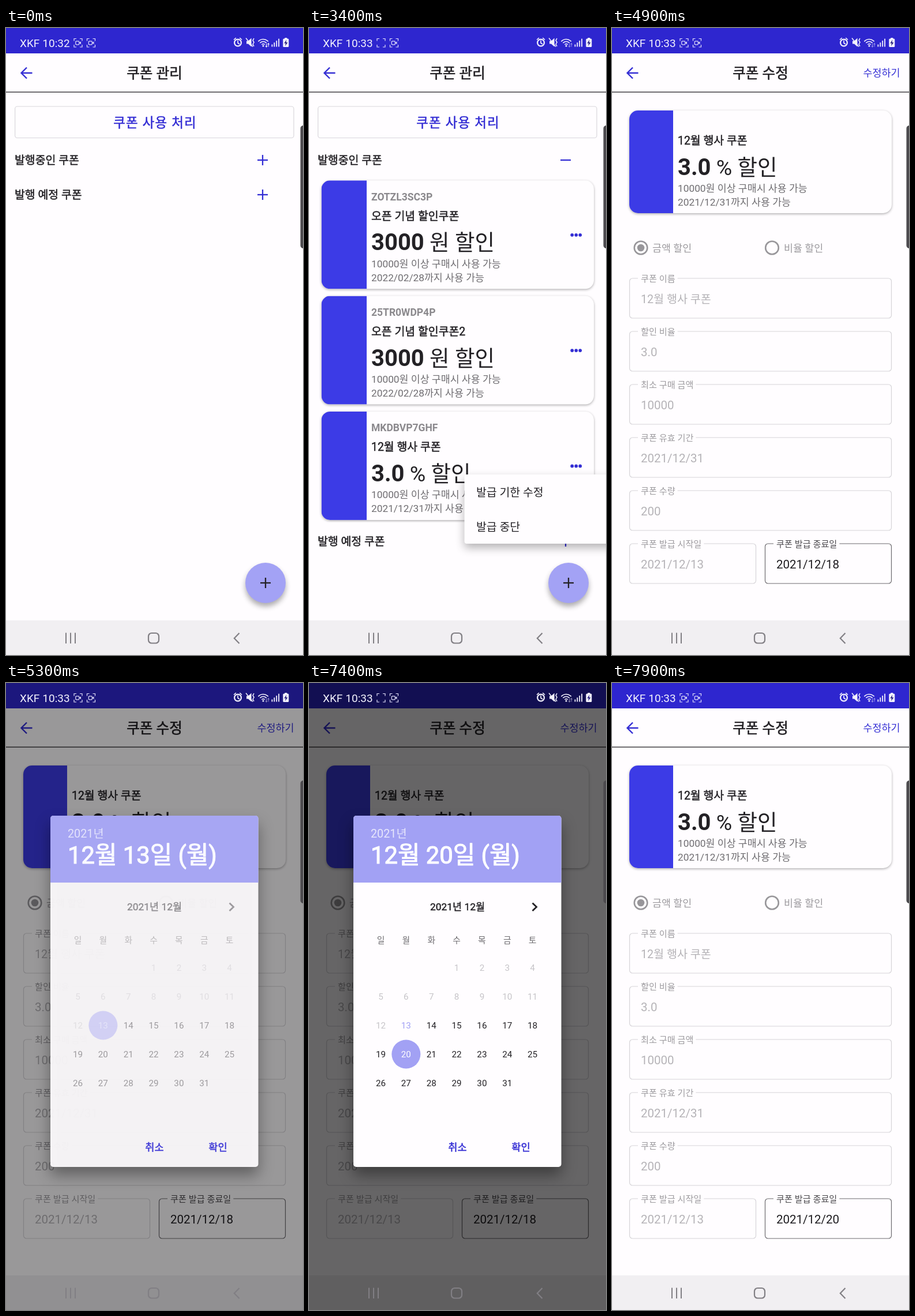
An HTML page with a canvas for the animation above (8000 ms loop, 515 by 1087 pixels).

```html
<!DOCTYPE html>
<html lang="ko">
<head>
<meta charset="utf-8">
<style>
  html, body { margin: 0; width: 100%; height: 100%; overflow: hidden; background: #fffdff; }
  canvas { display: block; width: 515px; height: 1087px; }
</style>
</head>
<body>
<canvas id="stage"></canvas>
<script>
const W = 515, H = 1087, LOOP = 8000, STEP = 100;
const PAPER = '#fffdff', BLUE = '#342ed4', BAND = '#3c3be6', LILAC = '#a2a1f4', INK = '#232125', GRAY = '#6f6d71';
const FONTS = 'Roboto, "Noto Sans CJK KR", "Noto Sans CJK", "Noto Sans CJK JP", sans-serif';

const canvas = document.getElementById('stage');
const ctx = canvas.getContext('2d');
const ratio = window.devicePixelRatio || 1;
canvas.width = W * ratio;
canvas.height = H * ratio;

const progress = (t, from, to) => Math.min(1, Math.max(0, (t - from) / (to - from)));
const easeOut = p => 1 - (1 - p) ** 3;
const mix = (a, b, p) => a + (b - a) * p;

// ---- drawing helpers ----
function layer(alpha, draw) {
  if (alpha <= 0) return;
  ctx.save();
  ctx.globalAlpha *= alpha;
  draw();
  ctx.restore();
}

// weight: 'regular', 'medium' (thin outline) or 'bold'; returns the advance width
function text(str, x, y, size, color, { weight = 'regular', align = 'left', spacing = 0 } = {}) {
  ctx.font = `${weight === 'bold' ? 700 : 400} ${size}px ${FONTS}`;
  ctx.textAlign = align;
  ctx.letterSpacing = spacing + 'px';
  ctx.fillStyle = color;
  ctx.fillText(str, x, y);
  if (weight === 'medium') {
    ctx.strokeStyle = color;
    ctx.lineWidth = size * 0.026;
    ctx.lineJoin = 'round';
    ctx.strokeText(str, x, y);
  }
  return ctx.measureText(str).width;
}

function rect(x, y, w, h, color) {
  ctx.fillStyle = color;
  ctx.fillRect(x, y, w, h);
}

function line(d, color, width) {
  ctx.strokeStyle = color;
  ctx.lineWidth = width;
  ctx.lineJoin = 'miter';
  ctx.stroke(new Path2D(d));
}

function shape(d, color) {
  ctx.fillStyle = color;
  ctx.fill(new Path2D(d));
}

function disc(x, y, r, color) {
  ctx.beginPath();
  ctx.arc(x, y, r, 0, Math.PI * 2);
  ctx.fillStyle = color;
  ctx.fill();
}

function ring(x, y, r, color, width) {
  ctx.beginPath();
  ctx.arc(x, y, r, 0, Math.PI * 2);
  ctx.strokeStyle = color;
  ctx.lineWidth = width;
  ctx.stroke();
}

function box(x, y, w, h, r, color, width = 1.2) {
  ctx.beginPath();
  ctx.roundRect(x, y, w, h, r);
  ctx.strokeStyle = color;
  ctx.lineWidth = width;
  ctx.stroke();
}

function shadowed(blur, drop, opacity, draw) {
  ctx.save();
  ctx.shadowColor = `rgba(0,0,0,${opacity})`;
  ctx.shadowBlur = blur * ratio;
  ctx.shadowOffsetY = drop * ratio;
  draw();
  ctx.restore();
}

function panel(x, y, w, h, r, color) {
  ctx.beginPath();
  ctx.roundRect(x, y, w, h, r);
  ctx.fillStyle = color;
  ctx.fill();
}

const minus = (x, y, r, color) => line(`M${x - r} ${y}h${2 * r}`, color, 2.3);
function plus(x, y, r, color) {
  minus(x, y, r, color);
  line(`M${x} ${y - r}v${2 * r}`, color, 2.3);
}

// ---- shared parts ----
function header(title) {
  rect(0, 0, W, 44, '#2e26cf');
  rect(0, 44, W, H - 44, PAPER);
  rect(0, 110.4, W, 1.4, '#343236');
  line('M45.5 78H27M36 68.5L26.5 78l9.5 9.5', BLUE, 2.4);
  text(title, 257.5, 87, 24.6, INK, { weight: 'medium', align: 'center' });
}

function couponCard(x, y, w, h, bandWidth) {
  shadowed(4, 1.5, 0.32, () => panel(x, y, w, h, 15, PAPER));
  ctx.save();
  ctx.beginPath();
  ctx.roundRect(x, y, w, h, 15);
  ctx.clip();
  rect(x, y, bandWidth, h, BAND);
  ctx.restore();
}

function couponText(x, y, { name, amount, unit, minimum, until }) {
  text(name, x, y, 19.4, INK, { weight: 'medium' });
  const used = amount ? text(amount, x, y + 52.5, 40, INK, { weight: 'bold' }) : 0;
  text(` ${unit} 할인`, x + used, y + 52.5, 37.5, INK);
  text(`${minimum}원 이상 구매시 사용 가능`, x, y + 82, 17.3, GRAY);
  text(`${until}까지 사용 가능`, x, y + 106, 17.3, GRAY);
}

const coupon = (code, name, amount, unit, until) => ({ code, name, amount, unit, minimum: '10000', until });
const coupons = [
  coupon('ZOTZL3SC3P', '오픈 기념 할인쿠폰', '3000', '원', '2022/02/28'),
  coupon('25TR0WDP4P', '오픈 기념 할인쿠폰2', '3000', '원', '2022/02/28'),
  coupon('MKDBVP7GHF', '12월 행사 쿠폰', '3.0', '%', '2021/12/31')
];
const blankCoupon = { name: '', amount: '', unit: '원', minimum: '', until: '' };

// ---- coupon list ----
function listScreen(t) {
  const open = easeOut(progress(t, 50, 400));
  const grown = 601 * open;
  header('쿠폰 관리');
  box(15.6, 136, 483.4, 54.5, 4, '#d9d7dc');
  text('쿠폰 사용 처리', 258.5, 172, 22.4, BLUE, { weight: 'medium', align: 'center', spacing: 1.25 });

  text('발행중인 쿠폰', 15, 236, 19.4, INK, { weight: 'medium' });
  (open > 0 ? minus : plus)(445, 229, 9, BLUE);

  ctx.save();
  ctx.beginPath();
  ctx.rect(0, 256, W, grown);
  ctx.clip();
  coupons.forEach((item, i) => {
    const y = 264.3 + i * 200.3;
    couponCard(21.5, y, 472.5, 188, 78.5);
    text(item.code, 108, y + 34.5, 17.5, '#8b898d', { weight: 'bold' });
    couponText(108, y + 68.5, item);
    for (const x of [456.2, 463.2, 470.2]) disc(x, y + 94.5, 2.9, BLUE);
  });
  ctx.restore();

  text('발행 예정 쿠폰', 15, 296 + grown, 19.4, INK, { weight: 'medium' });
  plus(445, 289 + grown, 9, BLUE);

  if (t >= 2100 && t < 2400) disc(463, 759, 25 * progress(t, 2000, 2200), 'rgba(0,0,0,.1)');

  shadowed(10, 6, 0.32, () => disc(450, 962, 35, '#a3a2f5'));
  plus(450, 962, 9, INK);
}

function menu(t) {
  const grow = easeOut(progress(t, 2150, 2500));
  const fade = Math.min(grow, 1 - progress(t, 4100, 4300));
  layer(fade, () => {
    ctx.translate(W, 774);
    ctx.scale(grow, grow);
    ctx.translate(-W, -774);
    shadowed(16, 7, 0.3, () => panel(269.5, 774, 260, 120, 4, PAPER));
    const press = progress(t, 3700, 4100);
    if (press > 0) {
      ctx.save();
      ctx.beginPath();
      ctx.rect(269.5, 774, 246, 60);
      ctx.clip();
      disc(392.5, 804, 121.5 * press, '#dedcdf');
      ctx.restore();
    }
    text('발급 기한 수정', 290, 811.5, 19.4, INK);
    text('발급 중단', 290, 871.5, 19.4, INK);
  });
}

// ---- coupon form ----
function field(x, y, w, rise, { hint, label = hint, value, size = 20.5, active }) {
  box(x, y, w, 69, 5, active ? '#6c6a6e' : '#d6d4d8');
  const caption = rise > 0 ? label : hint;
  const fontSize = mix(19.5, 15.2, rise);
  if (rise > 0) {
    ctx.font = `400 15.2px ${FONTS}`;
    ctx.letterSpacing = '0px';
    rect(x + 14.5, y - 2, ctx.measureText(caption).width + 9, 4, PAPER);
    text(value, x + 19.5, y + 43, size, active ? '#1d1b1f' : '#b5b3b7');
  }
  text(caption, x + 19.5, mix(y + 41, y + 6, rise), fontSize, active ? '#4c4a4e' : '#9d9b9f');
}

function editScreen(t) {
  const rise = easeOut(progress(t, 4100, 4400));
  header('쿠폰 수정');
  text('수정하기', 499.5, 84, 17.4, BLUE, { align: 'right' });
  couponCard(30, 143, 455, 178, 76);
  couponText(114, 202, rise > 0 ? coupons[2] : blankCoupon);

  ring(50, 381, 11.3, '#98969a', 2.6);
  disc(50, 381, 6.3, '#98969a');
  text('금액 할인', 70, 388, 17.4, '#9c9a9e');
  ring(277.5, 381, 11.3, '#98969a', 2.6);
  text('비율 할인', 298, 388, 17.4, '#9c9a9e');

  [
    { hint: '쿠폰 이름', value: '12월 행사 쿠폰', size: 19.6 },
    { hint: '할인 금액', label: '할인 비율', value: '3.0' },
    { hint: '최소 구매 금액', value: '10000' },
    { hint: '쿠폰 유효 기간', value: '2021/12/31' },
    { hint: '쿠폰 수량', value: '200' }
  ].forEach((item, i) => field(30.5, 434 + i * 92, 454, rise, item));
  field(30.5, 894, 219, rise, { hint: '쿠폰 발급 시작일', value: '2021/12/13' });
  field(265.5, 894, 219, rise, {
    hint: '쿠폰 발급 종료일', value: t >= 7800 ? '2021/12/20' : '2021/12/18', active: true
  });
}

// ---- date picker ----
function calendar(t, selected) {
  const column = i => 124.5 + i * 43.85;
  text('2021년 12월', 257.5, 394, 17.4, INK, { weight: 'medium', align: 'center' });
  line('M387.5 381.5l7 6.8-7 6.8', INK, 2.8);
  [...'일월화수목금토'].forEach((day, i) => text(day, column(i), 451, 14.8, GRAY, { align: 'center' }));
  for (let day = 1; day <= 31; day++) {
    const cell = day + 2;
    const x = column(cell % 7), y = 493.5 + Math.floor(cell / 7) * 50;
    let color = day < 13 ? '#c6c4c8' : day === 13 ? LILAC : INK;
    if (day === selected) {
      disc(x, y, 25, LILAC);
      color = '#fff';
    } else if (day === 20 && t === 6800) {
      disc(x, y, 20, 'rgba(162,161,244,.3)');
    }
    text(day, x, y + 5.5, 15.2, color, { align: 'center' });
  }
}

function datePicker(t) {
  const closing = 1 - progress(t, 7700, 7900);
  const selected = t >= 6900 ? 20 : 13;
  layer(0.6 * progress(t, 5100, 5400) * closing, () => rect(0, 0, W, H, '#000'));
  layer(progress(t, 5100, 5315) * closing, () => {
    shadowed(26, 14, 0.4, () => panel(77, 230, 360.5, 609, 5, PAPER));
    ctx.beginPath();
    ctx.roundRect(77, 230, 360.5, 116, [5, 5, 0, 0]);
    ctx.fillStyle = LILAC;
    ctx.fill();
    text('2021년', 107, 268, 19.8, 'rgba(255,255,255,.75)');
    text(`12월 ${selected}일 (월)`, 107, 313, 41.8, '#fff', { weight: 'medium' });
    layer(progress(t, 5200, 5422), () => calendar(t, selected));
    text('취소', 257.5, 811, 17.6, BLUE, { weight: 'medium', align: 'center' });
    text('확인', 367.5, 811, 17.6, BLUE, { weight: 'medium', align: 'center' });
  });
}

// ---- system bars ----
function recorder(x, withCamera) {
  const white = '#e2e0fa';
  line(`M${x} 22.5v-4h4M${x + 10} 18.5h4v4M${x + 14} 29v4h-4M${x + 4} 33h-4v-4`, white, 1.2);
  if (!withCamera) return;
  box(x + 2.8, 22.8, 6, 6, 1, white, 1.2);
  shape(`M${x + 9} 25.5l3-2.2v5l-3-2.2z`, white);
}

function systemBars(t) {
  const white = '#f3f2fd';
  const nextMinute = t >= 3200;
  text('XKF', 24, 33, 19, white);
  text(nextMinute ? '10:33' : '10:32', 63.3, 33, 19, white);
  recorder(118, Math.floor((t + 100) / 500) % 2 === 0);
  recorder(140.5, true);

  ring(402, 25.5, 5.9, white, 2.2);
  line('M402 21.5v4.5l3 2M395 20.5l3.8-3.3M409 20.5l-3.8-3.3', white, 1.6);
  shape('M417 22.5h3l5.5-5v15l-5.5-5h-3z', white);
  line('M416 17.5l12 15M430 18l-2 3.4 2 3.4-2 3.4 2 3.4', white, 1.5);
  for (const r of [3.5, 7.5, 11.5]) {
    ctx.beginPath();
    ctx.arc(446, 31, r, -Math.PI * 0.77, -Math.PI * 0.23);
    ctx.strokeStyle = white;
    ctx.lineWidth = 1.6;
    ctx.stroke();
  }
  disc(446, 31, 1.6, white);
  layer(nextMinute ? 0.5 : 1, () => line('M451.5 33v-6M450 31l1.5 2 1.5-2M455 26.5v6M453.5 28.5l1.5-2 1.5 2', white, 1.1));
  for (let i = 0; i < 4; i++) rect(460.5 + i * 3.9, 28.5 - i * 3.3, 1.8, 4 + i * 3.3, white);
  panel(480.3, 18.5, 10, 14.5, 1.5, white);
  rect(483.3, 17, 4, 2, white);
  shape('M486.3 20.5l-4 6h2.6l-.8 4.7 4.3-6.2h-2.7z', '#2a2380');

  line('M104 1048.5v18.5M112 1048.5v18.5M120 1048.5v18.5', '#817f84', 2);
  box(247, 1049, 18, 17.5, 5.5, '#817f84', 2.2);
  line('M404.5 1049l-8.7 9 8.7 9', '#817f84', 2.2);
  panel(510.5, 169, 12, 213, 5, '#4c4a4e');
}

// ---- timeline ----
function draw(t) {
  ctx.setTransform(ratio, 0, 0, ratio, 0, 0);
  if (t < 4100) listScreen(t);
  layer(progress(t, 3900, 4100), () => editScreen(t));
  rect(0, 1027, W, 60, '#f1eff2');
  menu(t);
  datePicker(t);
  systemBars(t);
}

const start = performance.now();
function tick() {
  const elapsed = (performance.now() - start) % LOOP;
  draw(Math.floor(elapsed / STEP) * STEP);
  requestAnimationFrame(tick);
}
tick();
</script>
</body>
</html>
```
